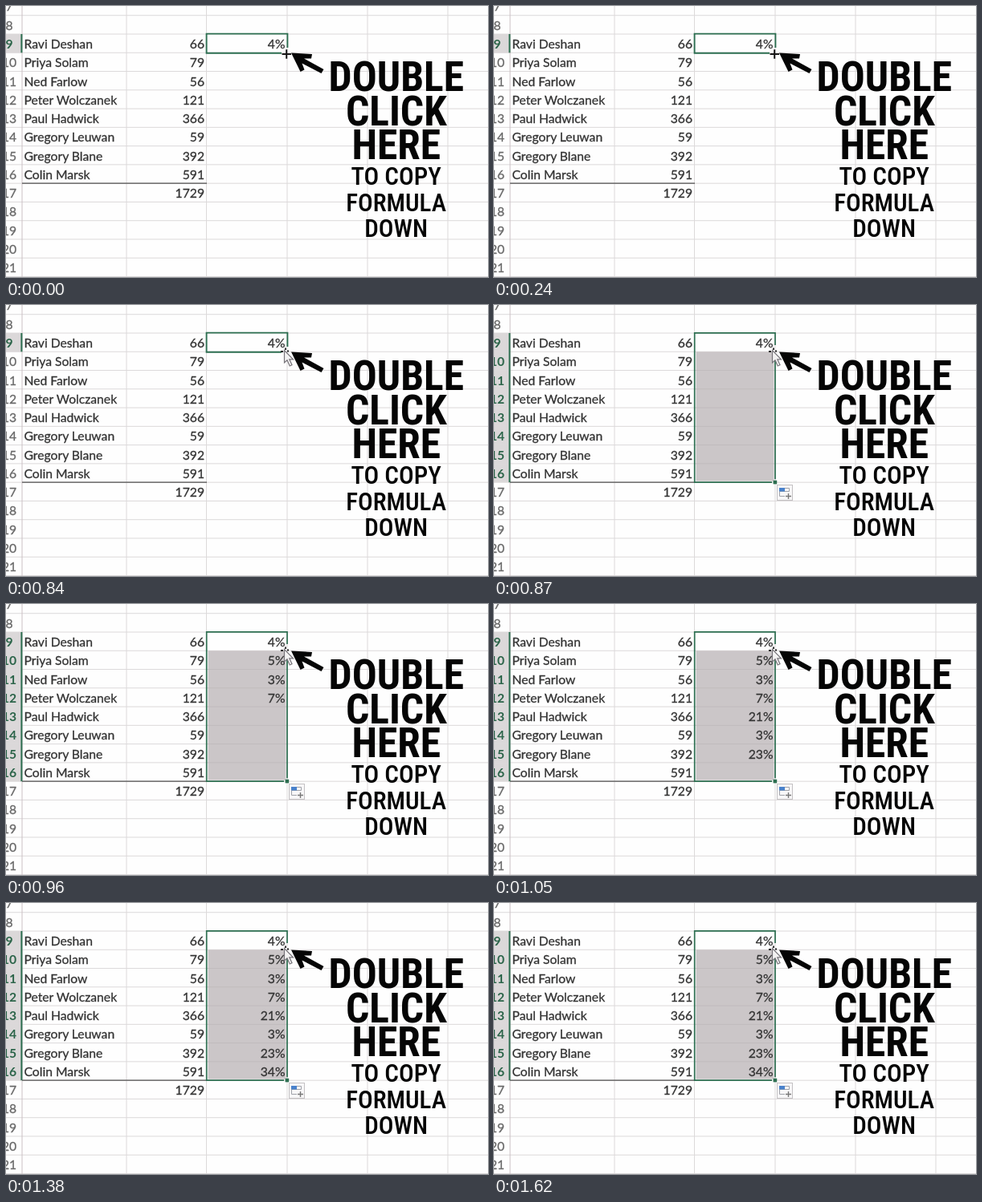
An HTML page that plays this animation: 600 px wide and 338 px high, repeating every 1650 ms.

```html
<!DOCTYPE html>
<html lang="en">
<head>
<meta charset="utf-8">
<title>Copy a formula down</title>
<style>
  html, body { margin: 0; width: 100%; height: 100%; overflow: hidden; background: #fff; }
  svg { display: block; width: 100vw; height: 100vh; }
  .cell, .head { font: 15.7px Lato, "Open Sans", sans-serif; stroke-width: .3px; }
  .cell { fill: #333; stroke: #333; }
  .num { text-anchor: end; }
  .head { fill: #686868; stroke: #686868; text-anchor: middle; }
  .head.on { font-weight: 700; fill: #2b6449; stroke: none; }
  .big, .small {
    font-family: "Roboto Condensed", Roboto, "Liberation Sans", sans-serif;
    font-stretch: condensed; text-anchor: middle; fill: #050505;
  }
  .big { font-size: 51.5px; font-weight: 700; }
  .small { font-size: 31px; font-weight: 500; }
  /* used when no condensed cut is installed */
  .wide .big { font-size: 50px; letter-spacing: -3.5px; }
  .wide .small { font-size: 30px; letter-spacing: -2.2px; }
</style>
</head>
<body>
<svg id="stage" viewBox="0 0 600 338"></svg>
<script>
const LOOP = 1650, CURSOR_AT = 660, FILL_AT = 870, FIRST_VALUE = 900, STEP = 30;
const TOP = 35, PITCH = 23.27, FIRST = 9, LAST = 16;
const GREEN = '#2c6e50', GRID = '#dcd9da';
const people = [
  ['Ravi Deshan', 66, 4], ['Priya Solam', 79, 5], ['Ned Farlow', 56, 3],
  ['Peter Wolczanek', 121, 7], ['Paul Hadwick', 366, 21], ['Gregory Leuwan', 59, 3],
  ['Gregory Blane', 392, 23], ['Colin Marsk', 591, 34]
];
const stage = document.getElementById('stage');

function add(tag, attrs, parent = stage, text) {
  const el = document.createElementNS('http://www.w3.org/2000/svg', tag);
  for (const key in attrs) el.setAttribute(key, attrs[key]);
  if (text !== undefined) el.textContent = text;
  return parent.appendChild(el);
}
const rect = (x, y, width, height, fill, parent) => add('rect', { x, y, width, height, fill }, parent);
const path = (d, attrs, parent) => add('path', { d, fill: 'none', ...attrs }, parent);
const label = (x, y, cls, text) => add('text', { x, y, class: cls }, stage, text);
const rowTop = n => TOP + (n - FIRST) * PITCH;
const show = (el, on) => el.setAttribute('visibility', on ? 'visible' : 'hidden');

// Sheet
rect(0, 0, 600, 338, '#fefefe');
const shade = rect(0, TOP, 19, PITCH, '#dbd8d9');
for (let n = 8; n <= 22; n++) path(`M0 ${rowTop(n)}H600`, { stroke: GRID });
for (const x of [150, 249.5, 350, 450, 550]) path(`M${x} 0V338`, { stroke: GRID });
path('M20 0V338', { stroke: '#cbc0c4' });
path(`M20 ${rowTop(17)}H250`, { stroke: '#505050', 'stroke-width': 1.4 });

const heads = [];
for (let n = 7; n <= 21; n++) heads[n] = label(4, rowTop(n) + 18, 'head', n);
const bar = rect(18.4, TOP, 2, PITCH, GREEN);

// Filled range
const range = add('g', {});
const rangeEnd = rowTop(LAST + 1);
rect(251.5, TOP + PITCH, 97, rangeEnd - TOP - PITCH - 1.5, '#cbc6c8', range);
for (let n = FIRST + 2; n <= LAST; n++) path(`M251.5 ${rowTop(n)}H348.5`, { stroke: '#c0bbbd' }, range);
path(`M350 50V34.8H249.7V${rangeEnd}H346M350 66V${rangeEnd - 4}`, { stroke: GREEN, 'stroke-width': 1.7 }, range);
rect(347.6, rangeEnd - 2.4, 4.6, 4.6, GREEN, range);
add('rect', { x: 352.5, y: 224.5, width: 19, height: 19, fill: '#f8f7f8', stroke: '#c4c1c3' }, range);
path('M355.5 228.5H367.5V232.5H355.5ZM355.5 232.5V238.5H362', { stroke: '#a0a3aa' }, range);
rect(355, 228, 7, 4.5, '#4a82cc', range);
path('M363 238.5H370M366.5 235V242', { stroke: '#777', 'stroke-width': 1.4 }, range);

// Single selected cell
const single = add('g', {});
path('M350.4 52V34.6H249.6V58.8H343', { stroke: GREEN, 'stroke-width': 1.9 }, single);

const values = people.map(([name, count, share], i) => {
  const y = rowTop(FIRST + i) + 18;
  label(22.5, y, 'cell', name);
  label(247, y, 'cell num', count);
  return label(347.5, y, 'cell num', share + '%');
});
label(247, rowTop(17) + 18, 'cell num', 1729);

// Pointers
const cross = path('M343.5 60H355M349.2 54.3V65.8', { stroke: '#161616', 'stroke-width': 2 });
const pointer = add('g', {});
path('M342 58H345M350 57.5H352M348 53.5V56', { stroke: '#202020', 'stroke-width': 1.8 }, pointer);
path('M346.5 56.5V72L350 68.8L353.2 76L356 74.8L352.8 67.8H357.5Z',
  { fill: '#f3f2f2', stroke: '#77747a', 'stroke-width': 1.2 }, pointer);

// Callout
path('M355 58.5L381 60L380 65.5L371 65.5L395.5 79L392.5 84L368.5 71.5L371.5 79.5L366.5 82Z', { fill: '#050505' });
const [title] = [['DOUBLE', 106], ['CLICK', 149], ['HERE', 191]].map(([t, y]) => label(485.8, y, 'big', t));
[['TO COPY', 222.5], ['FORMULA', 255.7], ['DOWN', 288]].forEach(([t, y]) => label(485.6, y, 'small', t));
stage.classList.toggle('wide', title.getComputedTextLength() > 177);

function draw(t) {
  const filled = t >= FILL_AT;
  const last = filled ? LAST : FIRST;
  const height = (last - FIRST + 1) * PITCH;
  shade.setAttribute('height', height);
  bar.setAttribute('height', height);
  heads.forEach((el, n) => el.setAttribute('class', n >= FIRST && n <= last ? 'head on' : 'head'));
  show(range, filled);
  show(single, !filled);
  show(cross, t < CURSOR_AT);
  show(pointer, t >= CURSOR_AT);
  values.forEach((el, i) => show(el, i === 0 || t >= FIRST_VALUE + (i - 1) * STEP));
}

const start = performance.now();
function tick(now) {
  draw(Math.max(0, now - start) % LOOP);
  requestAnimationFrame(tick);
}
draw(0);
requestAnimationFrame(tick);
</script>
</body>
</html>
```
